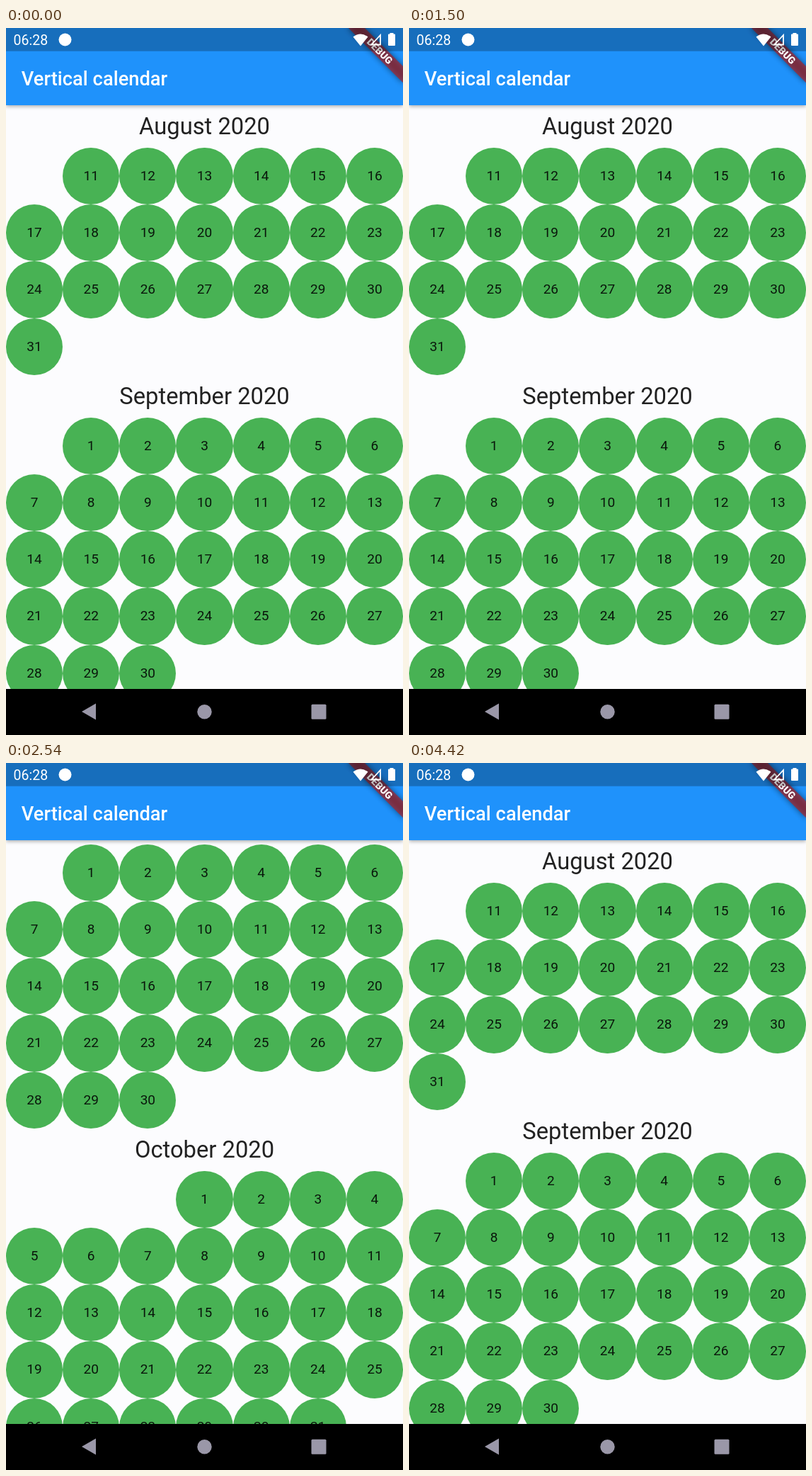
These frames come from a looping animation (561 px wide and 998 px high, 4460 ms). An HTML page:

```html
<!DOCTYPE html>
<html lang="en">
<head>
<meta charset="utf-8">
<title>Vertical calendar</title>
<style>
  html, body { margin: 0; width: 100%; height: 100%; overflow: hidden; background: #000; }
  body { font-family: Roboto, sans-serif; }
  #stage { position: relative; width: 561px; height: 998px; overflow: hidden; }
  #stage > * { position: absolute; left: 0; }
  #view { top: 109.2px; width: 561px; height: 823.8px; overflow: hidden; background: #fcfcfe; }
  #list { will-change: transform; color: rgba(0, 0, 0, .87); }
  h2 { margin: 0; height: 60.05px; font: 400 32.73px/60px Roboto, sans-serif; text-align: center; }
  .days { display: grid; grid-template-columns: repeat(7, 80.143px); grid-auto-rows: 80.2px; }
  .days span {
    border-radius: 50%; background: #48b254;
    font-size: 19.09px; line-height: 80.2px; text-align: center;
  }
  #glow { position: absolute; left: 0; top: 0; transform-origin: 0 0; }
  #bar {
    top: 0; width: 561px; height: 109.2px; background: #1f92fb;
    box-shadow: 0 2px 5px rgba(0, 0, 0, .3);
  }
  #title {
    position: absolute; left: 21.8px; top: 32.7px; color: #fff;
    font-size: 27.27px; font-weight: 500; line-height: 78px;
  }
  #over { top: 0; }
</style>
</head>
<body>
<div id="stage">
  <div id="view">
    <div id="list"></div>
    <svg id="glow" width="561" height="113">
      <circle cx="280.5" cy="-728.8" r="841.5" fill="#1a80f5"/>
    </svg>
  </div>
  <div id="bar"><div id="title">Vertical calendar</div></div>
  <svg id="over" width="561" height="998">
    <defs><filter id="soft" x="-20%" y="-60%" width="140%" height="220%"><feGaussianBlur stdDeviation="4"/></filter></defs>
    <g transform="translate(561 0) rotate(45)">
      <rect x="-54.5" y="38.2" width="109" height="16.4" fill="#000" opacity=".5" filter="url(#soft)"/>
      <rect x="-54.5" y="38.2" width="109" height="16.4" fill="#b71c1c" opacity=".63"/>
      <text y="51.3" fill="#fff" font-family="Roboto, sans-serif" font-size="13.9" font-weight="900" text-anchor="middle">DEBUG</text>
    </g>
    <rect width="561" height="32.7" opacity=".25"/>
    <g fill="#fff">
      <text x="10.6" y="24" font-family="Roboto, sans-serif" font-size="19.5">06:28</text>
      <circle cx="83.5" cy="16.5" r="9"/>
      <path d="M490.5 12.5Q501 4.5 511.5 12.5L501 25.5Z"/>
      <path d="M516.5 23.5H529V10Z" fill="none" stroke="#fff" stroke-width="1.8"/>
      <path d="M542.5 8.5V7H547.5V8.5H549Q550 8.5 550 9.5V24Q550 25 549 25H541Q540 25 540 24V9.5Q540 8.5 541 8.5Z"/>
    </g>
    <rect y="933" width="561" height="65"/>
    <g fill="#9a97a8">
      <path d="M107 965L127 953.5V976.5Z"/>
      <circle cx="280.5" cy="965.2" r="10.2"/>
      <rect x="431.5" y="954.7" width="21" height="21" rx="1.5"/>
    </g>
  </svg>
</div>
<script>
  const LOOP = 4460, TICK = 1000 / 24;
  const list = document.getElementById('list');
  const glow = document.getElementById('glow');

  // name, first day shown, last day, weekday column of the first day
  const months = [['August', 11, 31, 2], ['September', 1, 30, 2], ['October', 1, 31, 4], ['November', 1, 30, 7]];
  for (const [name, first, last, col] of months) {
    const head = document.createElement('h2');
    head.textContent = name + ' 2020';
    const days = document.createElement('div');
    days.className = 'days';
    for (let d = first; d <= last; d++) {
      const day = document.createElement('span');
      day.textContent = d;
      if (d === first) day.style.gridColumnStart = col;
      days.append(day);
    }
    list.append(head, days);
  }

  // tick, scroll offset, speed per tick: drag, fling, rest, flick back to the top
  const HIT = 82.9;
  const keys = [
    [39.5, 0, 0], [43, 116.3, 65], [51, 401.2, 12], [58, 435, 0],
    [76.5, 435, 0], [77, 428.6, -28], [79.5, 262, -95], [HIT, 0, -61]
  ];

  // edge glow: quick rise on impact, then a slow fade
  const RISE = 21, RECEDE = 600, PEAK = 0.88;

  function scrollAt(k) {
    const i = keys.findIndex(key => key[0] > k);
    if (i < 1) return 0;
    const [t0, p0, v0] = keys[i - 1], [t1, p1, v1] = keys[i];
    const h = t1 - t0, u = (k - t0) / h, w = 1 - u;
    return w * w * (1 + 2 * u) * p0 + u * u * (1 + 2 * w) * p1 + u * w * h * (w * v0 - u * v1);
  }

  function glowAt(k) {
    const t = (k - HIT) * TICK;
    if (t < 0 || t > RISE + RECEDE) return 0;
    return t < RISE ? 1 - (1 - t / RISE) ** 2 : (1 - (t - RISE) / RECEDE) ** 2;
  }

  function draw(now) {
    // the screen refreshes 24 times a second
    const k = Math.floor((now % LOOP + 3) / TICK);
    const g = glowAt(k);
    list.style.transform = `translateY(${-scrollAt(k)}px)`;
    glow.style.transform = `scaleY(${PEAK * g})`;
    glow.style.opacity = 0.3 * g;
  }

  let start;
  function loop(now) {
    start ??= now;
    draw(now - start);
    requestAnimationFrame(loop);
  }
  draw(0);
  requestAnimationFrame(loop);
</script>
</body>
</html>
```
